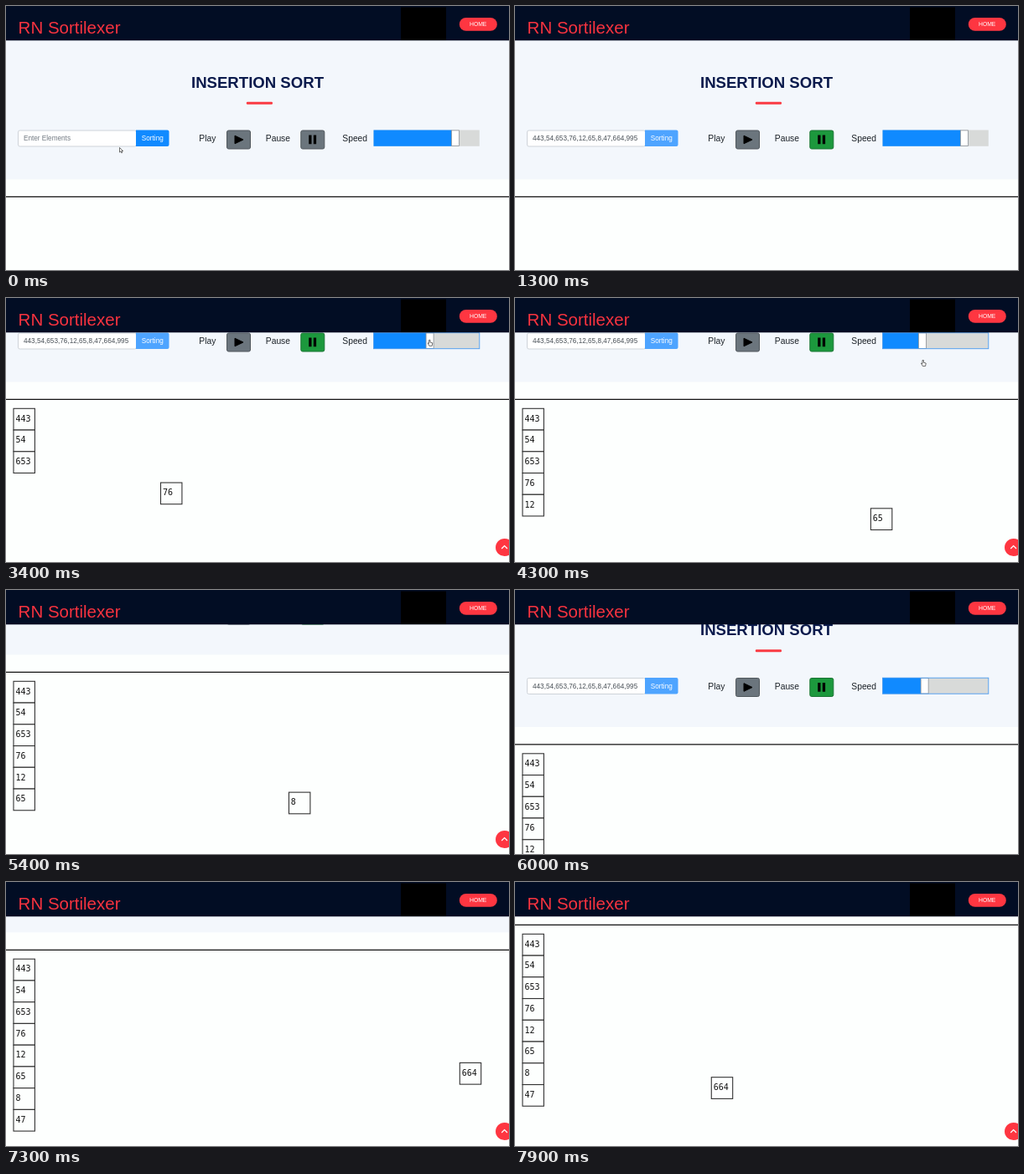
An HTML page that plays this animation: 600x316 px, repeating every 8000 ms.

```html
<!DOCTYPE html>
<html lang="en">
<head>
<meta charset="utf-8">
<title>Insertion sort</title>
<style>
  html, body { margin: 0; width: 100%; height: 100%; overflow: hidden; background: #fdfffe; }
  svg { display: block; width: 600px; height: 316px; }
  text { font-family: "Liberation Sans", Arial, sans-serif; }
  .label { font-size: 10.3px; fill: #1c2228; }
  .small { font-size: 8.2px; }
  .cell rect { fill: #fdfffe; stroke: #333; stroke-width: 1.1; }
  .cell text { font: 10px "DejaVu Sans Mono", monospace; fill: #111; }
</style>
</head>
<body>
<svg viewBox="0 0 600 316">
  <rect width="600" height="316" fill="#fdfffe"/>
  <g id="page">
    <rect width="600" height="207.5" fill="#f3f7fc"/>
    <text x="300" y="97.7" text-anchor="middle" font-size="18.6" font-weight="bold" fill="#0a1a4c">INSERTION SORT</text>
    <rect x="286.8" y="114.8" width="31.2" height="3" rx="1.2" fill="#fa3a42"/>

    <rect x="14.5" y="149" width="141" height="19" rx="2" fill="#fff" stroke="#ced3d9"/>
    <text id="entry" class="small" x="21" y="161.2"></text>
    <path id="sortButton" d="M155 148.5h37.5a2 2 0 0 1 2 2v15.5a2 2 0 0 1-2 2H155z"/>
    <text class="small" x="174.8" y="161.2" text-anchor="middle" fill="#fff">Sorting</text>

    <text class="label" x="230.3" y="162">Play</text>
    <rect x="263.5" y="149" width="28" height="22" rx="2" fill="#6b757d" stroke="#50575c"/>
    <path d="M273 155.2l10 4.8-10 4.8z" fill="#000" stroke="#000" stroke-linejoin="round"/>

    <text class="label" x="309.8" y="162">Pause</text>
    <rect id="pauseButton" x="351.8" y="149" width="28" height="22" rx="2"/>
    <path d="M361.2 154.6h3.3v10.6h-3.3zM366.8 154.6h3.3v10.6h-3.3z"/>

    <text class="label" x="401.3" y="162">Speed</text>
    <rect x="438.5" y="148.5" width="126.3" height="19.3" fill="#d8dad9"/>
    <rect id="fill" x="438.5" y="148.5" height="19.3" fill="#108aff"/>
    <rect id="thumb" y="148.9" width="9" height="18.6" fill="#fff" stroke="#8b9096" stroke-width=".8"/>
    <rect id="focus" x="438.5" y="148.7" width="126.3" height="19" fill="none" stroke="#4a9bf0" stroke-width=".9"/>

    <path d="M0 228.4H600" stroke="#111" stroke-width="1.3"/>
    <g id="cells"></g>
  </g>

  <rect width="600" height="41.3" fill="#020d24"/>
  <text x="14.6" y="32.6" font-size="20.5" fill="#f8333f">RN Sortilexer</text>
  <rect x="471" y="1.5" width="54" height="39.5" fill="#000"/>
  <rect x="540.8" y="14" width="45" height="15.8" rx="7.9" fill="#fe3641"/>
  <text x="563.2" y="24.4" text-anchor="middle" font-size="6.8" fill="#fff">HOME</text>

  <g id="toTop">
    <circle cx="594.6" cy="298.5" r="10.6" fill="#fe3641"/>
    <path d="M591.2 300l3.4-3.4 3.4 3.4" fill="none" stroke="#fff" stroke-width="1.3"/>
  </g>
  <g id="cursor" fill="#fff" stroke="#333" stroke-width=".7">
    <path id="arrow" d="M-1.5-2.5v5.6l1.3-1.2 1 2 .9-.4-.9-2h1.8z"/>
    <path id="hand" d="M-1-3.5v4L-2.5 0l1.8 3.5h3.3L3.2 0 .4-.8v-2.7z"/>
  </g>
</svg>
<script>
const LOOP = 8000;
const values = [443, 54, 653, 76, 12, 65, 8, 47, 664, 995];
const PITCH = 25.75;
const start = { x: 597, y: 355 };
const column = { x: 9, y: 239.3 };
const $ = id => document.getElementById(id);

// Tracks are lists of [time, value].
const scrollTrack = [[1350, 0], [1800, 107], [4800, 107], [5200, 130], [5500, 130], [5900, 43.5], [6850, 43.5], [7500, 177]];
const thumbTrack = [[3000, 531.5], [3700, 481.5], [5950, 481.5], [6400, 555.3]];
const insertTrack = [[1310, 0], [2400, 1.93], [4300, 5.2925], [5400, 6.4405], [7900, 8.616], [8000, 8.703]];
const cursorX = [[0, 137], [2400, 585], [3000, 536], [3700, 486], [4300, 487]];
const cursorY = [[0, 172], [500, 172], [1000, 70], [2400, 70], [3000, 52], [3700, 55], [4200, 78]];

const lerp = (a, b, k) => a + (b - a) * k;

function at(track, t, ease = k => k) {
  if (t <= track[0][0]) return track[0][1];
  for (let i = 1; i < track.length; i++) {
    const [t0, v0] = track[i - 1], [t1, v1] = track[i];
    if (t <= t1) return lerp(v0, v1, ease((t - t0) / (t1 - t0)));
  }
  return track[track.length - 1][1];
}
const smooth = k => k * k * (3 - 2 * k);

const show = (id, on) => $(id).setAttribute("visibility", on ? "visible" : "hidden");
const set = (id, attrs) => {
  for (const name in attrs) $(id).setAttribute(name, attrs[name]);
};

$("cells").innerHTML = values.map(v =>
  `<g class="cell"><rect width="25.4" height="25.7"/><text x="2.4" y="15.3">${v}</text></g>`).join("");
const cells = [...$("cells").children];

function render(t) {
  const scroll = at(scrollTrack, t, smooth);
  set("page", { transform: `translate(0 ${-scroll})` });
  show("toTop", scroll > 100);

  const entered = t >= 500, sorting = t >= 1000;
  $("entry").textContent = entered ? values.join(",") : "Enter Elements";
  set("entry", { fill: entered ? "#495057" : "#737b83" });
  set("sortButton", { fill: sorting ? "#4ea4ff" : "#108aff" });
  set("pauseButton", sorting
    ? { fill: "#1c983d", stroke: "#1a7534" }
    : { fill: "#6b757d", stroke: "#50575c" });

  const thumb = at(thumbTrack, t, smooth);
  set("fill", { width: thumb - 438.5 });
  set("thumb", { x: thumb });
  show("focus", t >= 3000);

  const inserted = at(insertTrack, t);
  cells.forEach((cell, i) => {
    const k = Math.min(1, inserted - i);
    cell.setAttribute("visibility", k > 0 ? "visible" : "hidden");
    const x = lerp(start.x, column.x, k);
    const y = lerp(start.y, column.y + i * PITCH, k);
    cell.setAttribute("transform", `translate(${x} ${y})`);
  });

  const pointing = t >= 3000;
  const cursorOn = t < 500 || (t >= 2000 && t < 4700);
  const x = t < 500 ? 137 : t < 2400 ? 585 : at(cursorX, t, smooth);
  set("cursor", { transform: `translate(${x} ${at(cursorY, t, smooth)})` });
  show("arrow", cursorOn && !pointing);
  show("hand", cursorOn && pointing);
}

function tick(now) {
  render(now % LOOP);
  requestAnimationFrame(tick);
}
render(0);
requestAnimationFrame(tick);
</script>
</body>
</html>
```
